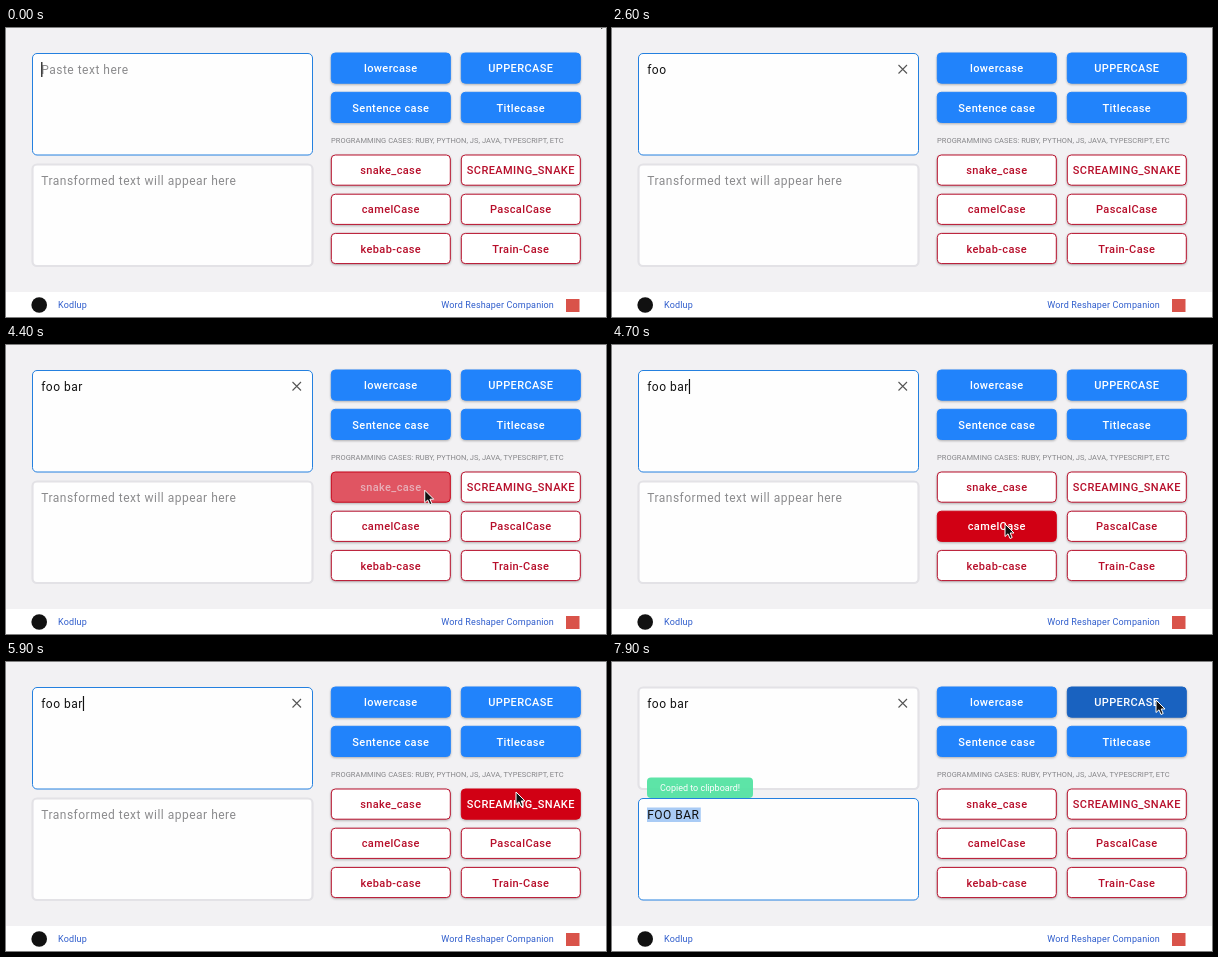
These frames come from a looping animation (600x289 px, 8000 ms). An HTML page:

```html
<!DOCTYPE html>
<html lang="en">
<head>
<meta charset="utf-8">
<title>Text case converter</title>
<style>
  html, body { margin: 0; width: 100%; height: 100%; overflow: hidden; background: #f2f1f3; }
  svg { display: block; width: 100vw; height: 100vh; font-family: Roboto, sans-serif; }
  .field { font-size: 12px; letter-spacing: .5px; fill: #111; }
  .hint { fill: #8b8b8d; }
  .button { filter: drop-shadow(0 1px 1px rgba(0, 0, 0, .28)); }
  .button text { font-size: 11px; font-weight: 500; letter-spacing: .375px; text-anchor: middle; }
  .caption { font-size: 7.5px; letter-spacing: .05px; fill: #858588; }
  .link { font-size: 9px; letter-spacing: .15px; fill: #2f5dcc; }
  .toast { font-size: 9px; fill: #fff; text-anchor: middle; }
</style>
</head>
<body>
<svg viewBox="0 0 600 289">
  <rect width="600" height="289" fill="#f2f1f3"/>
  <rect y="264" width="600" height="25" fill="#fff"/>

  <rect id="inputBox" x="26.5" y="25.5" width="280" height="101.5" rx="4.5" fill="#fefefe"/>
  <text id="input" class="field" x="35.2" y="46"></text>
  <rect id="caret" y="34" width="1.2" height="15" fill="#111"/>
  <path id="clear" d="M286.5 37l8.5 8.5m0-8.5l-8.5 8.5" stroke="#555" stroke-width="1.1"/>

  <rect id="outputBox" x="26.5" y="136.5" width="280" height="101.5" rx="4.5" fill="#fefefe"/>
  <rect id="selection" x="35" y="145.5" width="53.8" height="14.5" fill="#a9cbf5"/>
  <text id="output" class="field" x="35.2" y="157"></text>

  <g id="toast" class="toast">
    <rect x="35" y="115.5" width="106" height="20.5" rx="4" fill="#55e3a3"/>
    <text x="88" y="129">Copied to clipboard!</text>
  </g>

  <text class="caption" x="325" y="115.3">PROGRAMMING CASES: RUBY, PYTHON, JS, JAVA, TYPESCRIPT, ETC</text>
  <g id="buttons"></g>

  <circle cx="33.2" cy="277" r="7.8" fill="#111"/>
  <text class="link" x="52" y="280.3">Kodlup</text>
  <text class="link" x="548" y="280.3" text-anchor="end">Word Reshaper Companion</text>
  <rect x="560" y="271" width="13.5" height="13" fill="#d9534a"/>

  <path id="cursor" d="M0 0V12.5L3 9.8 5 14.5 7.2 13.5 5.2 9H9Z" fill="#111" stroke="#fff" stroke-width="1"/>
</svg>
<script>
const LOOP = 8000, BLINK = 500, CLICK = 7700;
const $ = id => document.getElementById(id);
const set = (el, attrs) => { for (const k in attrs) el.setAttribute(k, attrs[k]); };
const show = (el, on) => set(el, { visibility: on ? 'visible' : 'hidden' });
const clamp = v => Math.max(0, Math.min(1, v));
const mix = (a, b, k) => a + (b - a) * k;
const mixColor = (a, b, k) => `rgb(${a.map((v, i) => Math.round(mix(v, b[i], k)))})`;

const WHITE = [255, 255, 255], CRIMSON = [183, 14, 42];
const THEMES = {
  blue: { fill: [33, 131, 251], hover: [25, 98, 192], text: WHITE },
  red: { fill: WHITE, hover: [209, 0, 20], text: CRIMSON }
};
const ROWS = [
  [25, 'blue', 'lowercase', 'UPPERCASE'],
  [64.3, 'blue', 'Sentence case', 'Titlecase'],
  [127, 'red', 'snake_case', 'SCREAMING_SNAKE'],
  [166.2, 'red', 'camelCase', 'PascalCase'],
  [205.4, 'red', 'kebab-case', 'Train-Case']
];
const WIDTH = 119, HEIGHT = 30.2;

// When each key lands, with the number of letters typed by then.
const MESSAGE = 'foo\u00a0bar';
const KEYS = [0, 700, 1000, 1200, 2000, 2700, 3200, 3500];

// Pointer path: time, x, y.
const PATH = [
  [0, 590, -13], [3700, 480, -22], [4100, 485, 60], [4450, 415, 150], [4700, 393, 179],
  [4950, 404, 208], [5150, 412, 190], [5400, 397, 143], [5700, 470, 150], [5900, 510, 130],
  [6200, 545, 12], [6450, 544, 38], [LOOP, 544, 38]
];

function svg(tag, attrs, parent) {
  const el = document.createElementNS('http://www.w3.org/2000/svg', tag);
  set(el, attrs);
  return parent.appendChild(el);
}

const buttons = ROWS.flatMap(([y, theme, ...labels]) => labels.map((label, column) => {
  const x = 325.3 + column * 130;
  const group = svg('g', { class: 'button' }, $('buttons'));
  const box = svg('rect', { x, y, width: WIDTH, height: HEIGHT, rx: 4 }, group);
  const text = svg('text', { x: x + WIDTH / 2, y: y + HEIGHT / 2 + 4.1 }, group);
  text.textContent = label;
  return { x, y, theme, box, text };
}));

function pointerAt(t) {
  if (t < 3700) return PATH[0].slice(1);
  const i = PATH.findIndex(p => p[0] > t);
  const [t0, x0, y0] = PATH[i - 1], [t1, x1, y1] = PATH[i];
  const u = (t - t0) / (t1 - t0), k = u * u * (3 - 2 * u);
  return [mix(x0, x1, k), mix(y0, y1, k)];
}

// Share of the last 120 ms spent over a button, which gives a short colour fade.
function hoverAmount(button, t) {
  let inside = 0;
  for (let i = 0; i < 6; i++) {
    const [x, y] = pointerAt(Math.max(0, t - i * 20));
    if (x >= button.x && x <= button.x + WIDTH && y >= button.y && y <= button.y + HEIGHT) inside++;
  }
  return inside / 6;
}

function drawButton(button, t) {
  const { fill, hover, text } = THEMES[button.theme];
  const k = hoverAmount(button, t);
  const color = mixColor(fill, hover, k);
  set(button.box, { fill: color, stroke: button.theme === 'red' ? mixColor(CRIMSON, hover, k) : color });
  set(button.text, { fill: mixColor(text, WHITE, k) });
}

function drawField(box, focused) {
  set(box, focused ? { stroke: '#2480df', 'stroke-width': 1 } : { stroke: '#e3e2e6', 'stroke-width': 2.2 });
}

function drawText(el, value, placeholder) {
  el.textContent = value || placeholder;
  el.classList.toggle('hint', !value);
}

function draw(t) {
  const done = t >= CLICK;
  const typed = KEYS.filter(k => k <= t).length - 1;

  drawField($('inputBox'), !done);
  drawField($('outputBox'), done);
  drawText($('input'), MESSAGE.slice(0, typed), 'Paste text here');
  drawText($('output'), done ? MESSAGE.toUpperCase() : '', 'Transformed text will appear here');

  set($('caret'), { x: 35.2 + (typed ? $('input').getComputedTextLength() : 0) });
  show($('caret'), !done && Math.floor((t - KEYS[typed]) / BLINK) % 2 === 0);
  show($('clear'), typed > 0);
  show($('selection'), done);

  const rise = clamp((t - CLICK + 80) / 280);
  show($('toast'), done);
  set($('toast'), { opacity: .95 * rise, transform: `translate(0 ${4 * (1 - rise)})` });

  buttons.forEach(button => drawButton(button, t));
  set($('cursor'), { transform: `translate(${pointerAt(t)})` });
  show($('cursor'), t < 700 || t >= 3700);
}

const start = performance.now();
function frame() {
  draw((performance.now() - start) % LOOP);
  requestAnimationFrame(frame);
}
frame();
</script>
</body>
</html>
```
